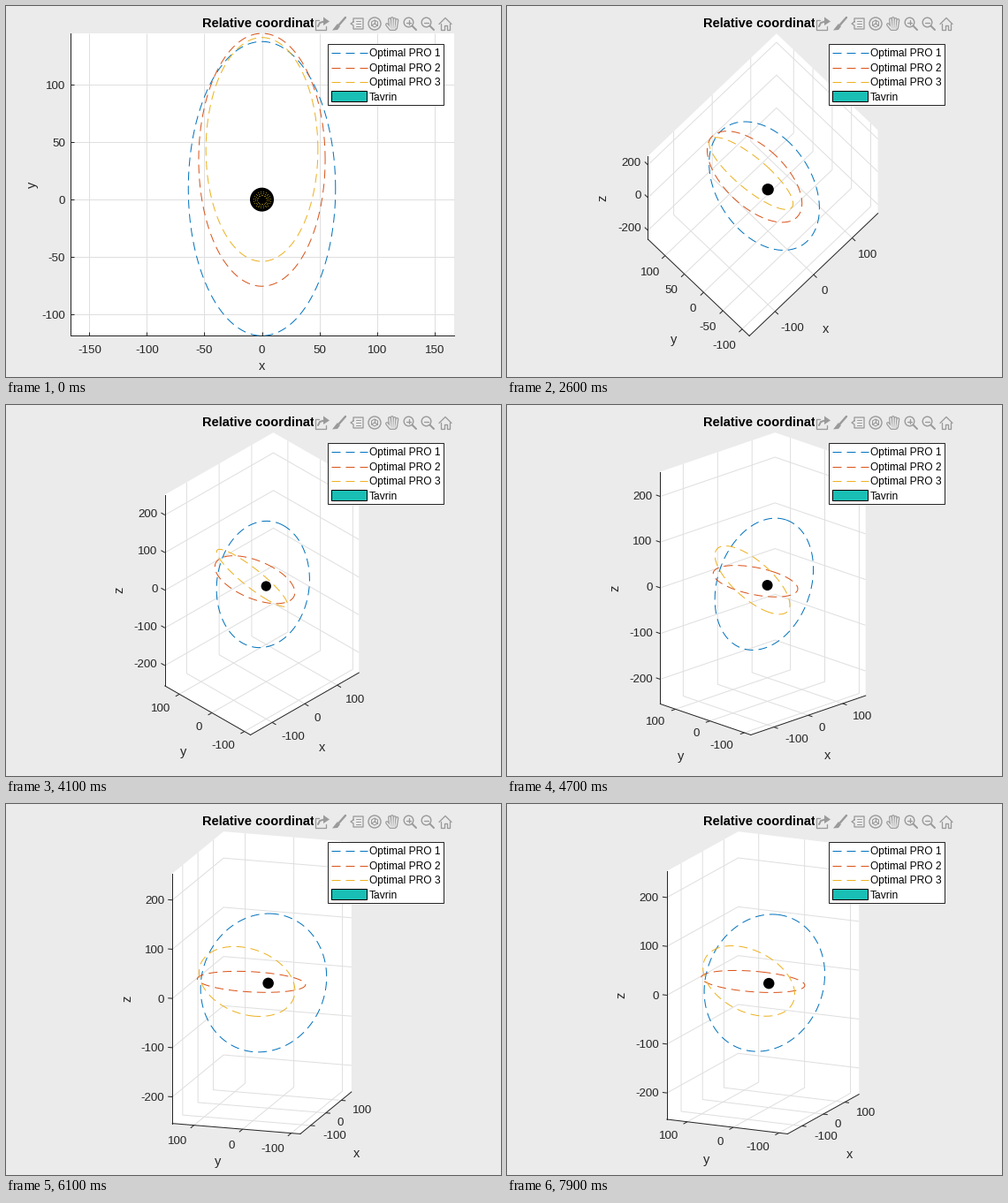
Write a matplotlib script that moves like this. It is 560x420 px and loops after 8000 ms.

```python
import numpy as np
import matplotlib.pyplot as plt
from matplotlib.animation import FuncAnimation
from matplotlib.collections import LineCollection
from matplotlib.patches import Circle, Polygon, Rectangle

W, H, DPI = 560, 420, 100
PX = 72 / DPI  # points per pixel
plt.rcParams["font.family"] = "Liberation Sans"

BG, INK, GRID, ICON = "#ebebeb", "#262626", "#dfdfdf", "#9a9a9a"
FRAMES, INTERVAL = 80, 100
STEP = 2.5  # camera degrees per frame
TOP_VIEW_END, TURN_START, TURN_END = 19, 50, 69

# Axes area in pixels and data limits
CENTER = np.array([289.52, 202.3])
AREA = np.array([434, 342.3])
LO = np.array([-166.8, -118.6, -254])
HI = np.array([166.8, 144.5, 254])
SPAN, MID = HI - LO, (LO + HI) / 2
X, Y, Z = np.eye(3)

# color, half width in x, centre in y, amplitude in z
ORBITS = [("#0072bd", 64, 9.5, 124),
          ("#d95319", 55, 34.6, 5.5),
          ("#edb120", 48.7, 43.6, -83)]
DASH = (0, (10, 6))

fig = plt.figure(figsize=(W / DPI, H / DPI), dpi=DPI, facecolor=BG)
ax = fig.add_axes([0, 0, 1, 1])


def camera_angles(i):
    """Turn about z and elevation, in degrees."""
    if i < TOP_VIEW_END:
        return 0, 90
    if i == TOP_VIEW_END:  # straight down, the up vector follows the box shape
        return np.degrees(np.arctan2(SPAN[0], SPAN[1])), 90
    elevation = max(90 - STEP * (i - TOP_VIEW_END), 15)
    if i < TURN_END:
        return min(45 + STEP * max(i - TURN_START, 0), 90), elevation
    return 90 - STEP * (i - TURN_END), elevation


class View:
    """Orthographic camera that fits the data box into the axes area."""

    def __init__(self, turn, elevation):
        a, e = np.radians([turn, elevation])
        self.basis = np.array([
            [np.cos(a), -np.sin(a), 0],
            [-np.sin(a) * np.sin(e), -np.cos(a) * np.sin(e), -np.cos(e)]])
        self.scale = min(AREA / (np.abs(self.basis) @ SPAN))

    def project(self, points):
        return CENTER + self.scale * (np.asarray(points) - MID) @ self.basis.T

    def direction(self, vector):
        v = self.basis @ vector
        return v / max(np.hypot(*v), 1e-9)

    def ticks(self, k):
        """Tick values of axis k, as dense as the labels allow."""
        dx, dy = np.abs(self.basis[:, k]) * self.scale
        if k == 2:
            step = 100 if dy * SPAN[k] > 110 else 200
        else:
            count = 2 * (HI[k] // 50) + 1
            step = 50 if 50 * dx > 30 or 50 * dy > 3 * count else 100
        return step * np.arange(np.ceil(LO[k] / step), HI[k] // step + 1)


def line(points, color=INK, width=1.0, **kw):
    ax.plot(*np.asarray(points, float).T, color=color, lw=width * PX, **kw)


def segments(parts, color=INK):
    ax.add_collection(LineCollection(parts, colors=color, linewidths=PX))


def text(x, y, s, size=13.33, ha="center", drop=.36, color=INK, **kw):
    ax.text(x, y + drop * size, s, fontsize=size * PX, ha=ha, color=color, **kw)


def axis_name(x, y, s, upright=True):
    if upright:
        text(x, y, s, 14.67, drop=.26)
    else:
        ax.text(x, y, s, fontsize=14.67 * PX, color=INK, rotation=90,
                ha="center", va="center")


def corner(**fixed):
    """Corner at the low limits with some coordinates replaced."""
    p = LO.copy()
    for name, value in fixed.items():
        p["xyz".index(name)] = value
    return p


def draw_box(view, values):
    (x0, y0, z0), (x1, y1, z1) = LO, HI
    outline = [(x0, y0, z0), (x1, y0, z0), (x1, y0, z1),
               (x1, y1, z1), (x0, y1, z1), (x0, y1, z0)]
    ax.add_patch(Polygon(view.project(outline), fc="white", ec="none"))
    grid = [[(v, y0, z0), (v, y1, z0), (v, y1, z1)] for v in values[0]]
    grid += [[(x0, v, z0), (x1, v, z0), (x1, v, z1)] for v in values[1]]
    grid += [[(x0, y1, v), (x1, y1, v), (x1, y0, v)] for v in values[2]]
    segments([view.project(g) for g in grid], GRID)


def draw_flat_axes(view, values):
    line(view.project([corner(y=HI[1]), LO, corner(x=HI[0])]))
    marks = []
    for v in values[0]:
        x, y = view.project(corner(x=v))
        marks.append([(x, y), (x, y - 4)])
        text(x, 388, f"{v:.0f}")
    for v in values[1]:
        x, y = view.project(corner(y=v))
        marks.append([(x, y), (x + 4, y)])
        text(67, y, f"{v:.0f}", ha="right")
    segments(marks)
    axis_name(290, 408, "x")
    axis_name(30, 202, "y", upright=False)


def draw_ground_axis(view, name, values, outward, name_offset):
    k = "xy".index(name)
    line(view.project([LO, corner(**{name: HI[k]})]))
    dx, dy = tick = view.direction(outward)
    marks = []
    for v in values:
        x, y = base = view.project(corner(**{name: v}))
        marks.append([base, base + 5 * tick])
        label = f"{v:.0f}"
        half = 3.6 * len(label)
        text(x + dx * (13 + half), y + 9 + 12 * dy, label)
    segments(marks)
    axis_name(*view.project(corner(**{name: MID[k]})) + name_offset, name)


def draw_height_axis(view, values):
    line(view.project([corner(y=HI[1]), corner(y=HI[1], z=HI[2])]))
    marks = []
    for v in values:
        base = view.project(corner(y=HI[1], z=v))
        x, y = end = base + 5 * view.direction(Y)
        marks.append([base, end])
        text(x - 4, y, f"{v:.0f}", ha="right")
    segments(marks)
    x, y = view.project(corner(y=HI[1], z=0))
    axis_name(x - 51, y, "z", upright=False)


def draw_solid_axes(view, values, turn, elevation):
    tilt, spin = (elevation - 15) / 75, (turn - 45) / 45
    draw_ground_axis(view, "x", values[0], -Y,
                     (23 - 12 * tilt + 32 * spin ** 2, 44 + 24 * tilt + 4 * spin))
    draw_ground_axis(view, "y", values[1], -X,
                     (-28 + 11 * spin, 41 + 24 * tilt - 6 * spin))
    if elevation < 90:
        draw_height_axis(view, values[2])


def draw_orbits(view):
    t = np.linspace(0, 2 * np.pi, 361)
    for color, half, middle, height in ORBITS:
        path = np.stack([half * np.cos(t), middle + 2 * half * np.sin(t),
                         height * np.cos(t)], -1)
        line(view.project(path), color, ls=DASH)


def draw_craft(view, flat):
    x, y = view.project(0 * X)
    ax.add_patch(Circle((x, y), 10 * view.scale + .5, fc="black", zorder=3))
    if flat:
        t, r = np.meshgrid((np.arange(20) + .5) * np.pi / 10, [5.2, 7.4, 9.3])
        ax.scatter(x + r * np.cos(t), y + r * np.sin(t), s=.7, c="#8c7a14",
                   linewidths=0, zorder=4)


def draw_legend():
    ax.add_patch(Rectangle((364, 43), 131, 69, fc="white", ec=INK, lw=PX, zorder=5))
    ax.add_patch(Rectangle((368, 96), 40, 12, fc="#19bfb5", ec="black",
                           lw=PX, zorder=6))
    for k, name in enumerate(["Optimal PRO 1", "Optimal PRO 2",
                              "Optimal PRO 3", "Tavrin"]):
        y = 53 + 16.6 * k
        text(411, y - .3, name, 12, ha="left", color="black", zorder=6)
        if k < len(ORBITS):
            line([(368, y), (409, y)], ORBITS[k][0], ls=DASH, zorder=6)


def stroke(points, width=1.3, color=ICON):
    line(points, color, width, zorder=8, solid_capstyle="round")


def blob(points):
    ax.add_patch(Polygon(points, fc=ICON, ec="none", zorder=8))


def ring(x, y, r):
    ax.add_patch(Circle((x, y), r, fc="none", ec=ICON, lw=1.4 * PX, zorder=8))


def draw_export(x, y):
    stroke([(x - 3, y - 4), (x - 7, y - 4), (x - 7, y + 7), (x + 5, y + 7), (x + 5, y + 3)])
    stroke([(x - 4, y + 3), (x - 2, y - 1), (x + 3, y - 2.5)], 2)
    blob([(x + 2, y - 7.5), (x + 9, y - 2.5), (x + 2, y + 2)])


def draw_brush(x, y):
    stroke([(x + 7, y - 7), (x, y + 1)], 2.4)
    blob([(x - 2, y), (x + 1, y + 3), (x - 2, y + 7), (x - 8, y + 7.5)])


def draw_data_tip(x, y):
    stroke([(x - 4, y - 2), (x - 4, y - 6), (x + 7, y - 6), (x + 7, y + 6),
            (x - 4, y + 6), (x - 4, y + 2), (x - 7, y), (x - 4, y - 2)])
    for dy in (-3, 0, 3):
        stroke([(x - 1, y + dy), (x + 4, y + dy)], 1)


def draw_rotate(x, y):
    ring(x, y, 7)
    t = np.arange(7) * np.pi / 3 + np.pi / 6
    cube = np.stack([x + 4 * np.cos(t), y + 4 * np.sin(t)], -1)
    stroke(cube, 1.1)
    for vertex in cube[:6:2]:
        stroke([(x, y), vertex], 1.1)


def draw_hand(x, y):
    for width, color in ((3.9, ICON), (1.5, BG)):
        for k in range(4):
            stroke([(x - 3 + 2.8 * k, y - 6 + abs(k - 1)), (x - 2 + 2 * k, y + 5)],
                   width, color)
        stroke([(x - 6, y + 1), (x - 2, y + 6), (x + 3, y + 6)], width, color)


def draw_zoom(x, y, zoom_in):
    ring(x - 1.5, y - 1.5, 5.3)
    stroke([(x + 2.5, y + 2.5), (x + 7, y + 7)], 2)
    stroke([(x - 4, y - 1.5), (x + 1, y - 1.5)])
    if zoom_in:
        stroke([(x - 1.5, y - 4), (x - 1.5, y + 1)])


def draw_home(x, y):
    stroke([(x - 7, y + .5), (x, y - 6.5), (x + 7, y + .5)])
    for side in (-1, 1):
        stroke([(x + side * 5, y), (x + side * 5, y + 7),
                (x + side * 1.5, y + 7), (x + side * 1.5, y + 2), (x, y + 2)])


def draw_header():
    text(222, 19, "Relative coordinate", 14.67, ha="left", color="black",
         weight="bold")
    ax.add_patch(Rectangle((347.5, 10), 160, 20, fc=BG, ec="none", zorder=7))
    icons = [draw_export, draw_brush, draw_data_tip, draw_rotate, draw_hand,
             lambda x, y: draw_zoom(x, y, True),
             lambda x, y: draw_zoom(x, y, False), draw_home]
    for k, icon in enumerate(icons):
        icon(357 + 20 * k, 20)


def update(i):
    ax.cla()
    ax.set(xlim=(0, W), ylim=(H, 0))
    ax.axis("off")
    turn, elevation = camera_angles(i)
    flat = i < TOP_VIEW_END
    view = View(turn, elevation)
    values = [view.ticks(k) for k in range(3)]
    if elevation == 90:
        values[2] = []
    draw_box(view, values)
    if flat:
        draw_flat_axes(view, values)
    else:
        draw_solid_axes(view, values, turn, elevation)
    draw_orbits(view)
    draw_craft(view, flat)
    draw_legend()
    draw_header()
    return []


animation = FuncAnimation(fig, update, frames=FRAMES, interval=INTERVAL,
                          init_func=lambda: update(0), repeat=True, repeat_delay=0)
plt.show()
```
